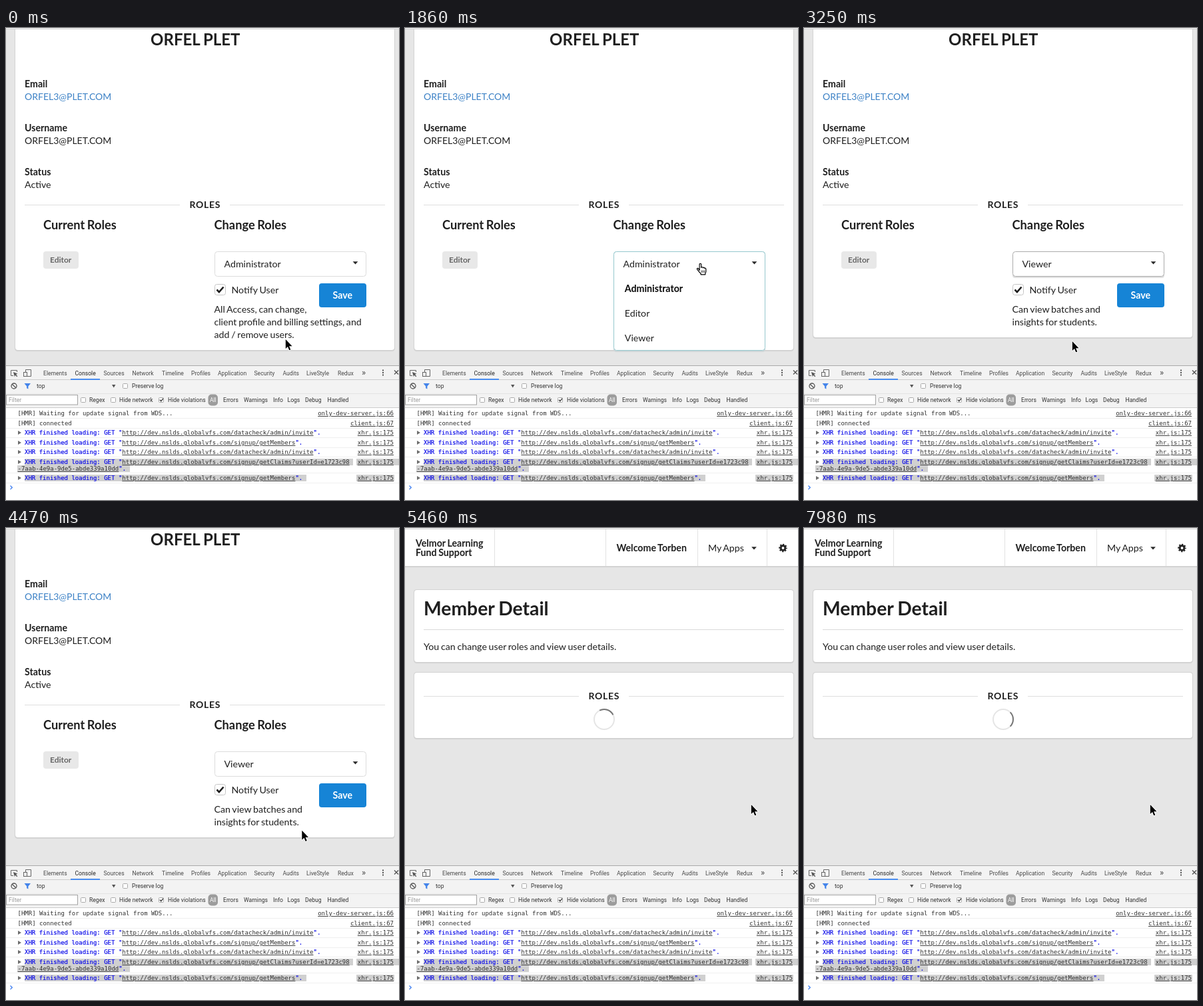
These frames come from a looping animation (590x708 px, 8000 ms). An HTML page:

```html
<!DOCTYPE html>
<html lang="en">
<head>
<meta charset="utf-8">
<title>Member roles</title>
<style>
html, body { margin: 0; width: 590px; height: 708px; overflow: hidden; background: #e6e6e6; }
svg { display: block; }
text { white-space: pre; font: 14.2px Lato, sans-serif; word-spacing: -.9px; fill: #1f1f1f; }
.b { font-weight: 700; }
.ui text { font: 8.6px Roboto, sans-serif; word-spacing: 0; fill: #484848; }
.log text { font: 9px "DejaVu Sans Mono", monospace; word-spacing: 0; fill: #303030; }
.log .blue { fill: #0808e8; stroke: #0808e8; stroke-width: .2px; }
.log .url { text-decoration: underline; }
</style>
</head>
<body>
<svg id="stage" width="590" height="708" viewBox="0 0 590 708"></svg>
<script>
const NS = 'http://www.w3.org/2000/svg';
const stage = document.getElementById('stage');

function el(parent, tag, attrs = {}, text) {
  const node = document.createElementNS(NS, tag);
  for (const k in attrs) node.setAttribute(k, attrs[k]);
  if (text !== undefined) node.textContent = text;
  parent.appendChild(node);
  return node;
}
const group = (parent, cls = '') => el(parent, 'g', { class: cls });
const rect = (p, x, y, width, height, fill, more) => el(p, 'rect', { x, y, width, height, fill, ...more });
const path = (p, d, more) => el(p, 'path', { d, ...more });
const line = (p, d, stroke = '#dedede', more) => path(p, d, { fill: 'none', stroke, ...more });
function label(p, x, y, s, style = '', cls = '', anchor = 'start') {
  return el(p, 'text', { x, y, style, class: cls, 'text-anchor': anchor }, s);
}
const bold = (p, x, y, s, size = 14.2, anchor) => label(p, x, y, s, `font-size:${size}px`, 'b', anchor);
const caret = (p, x, y) => path(p, `M${x - 3.9} ${y}h7.8l-3.9 4.2z`, { fill: '#2a2a2a' });
const show = (node, on) => node.setAttribute('display', on ? 'inline' : 'none');

function card(p, y, h) {
  return [
    rect(p, 13, y - 1, 571, h + 3, '#d3d3d3', { rx: 4.5 }),
    rect(p, 14, y, 569, h, '#fff', { rx: 4 }),
  ];
}
function divider(p, y) {
  line(p, `M28 ${y + .5}H261M336 ${y + .5}H569`);
  label(p, 298.9, y + 5, 'ROLES', 'font-size:14px;letter-spacing:.7px', 'b', 'middle');
}

// Role editor view
rect(stage, 0, 0, 590, 708, '#e6e6e6');
const detail = group(stage);
const cardParts = card(detail, -10, 493);
bold(detail, 284.3, 26, 'ORFEL PLET', 24, 'middle');
bold(detail, 28, 89, 'Email');
label(detail, 28, 108, 'ORFEL3@PLET.COM', 'fill:#3d82c6;font-size:14px');
bold(detail, 28, 155, 'Username');
label(detail, 28, 174, 'ORFEL3@PLET.COM', 'font-size:14px');
bold(detail, 28, 221, 'Status');
label(detail, 28, 240, 'Active');
divider(detail, 265);
bold(detail, 56, 302, 'Current Roles', 18.25);
bold(detail, 312.5, 302, 'Change Roles', 18.25);
rect(detail, 56, 335, 53, 26, '#e8e8e8', { rx: 4 });
label(detail, 66, 352, 'Editor', 'font-size:12px;fill:#666', 'b');

const form = group(detail);
rect(form, 313.5, 384.5, 16, 16, '#fff', { rx: 3, stroke: '#c4c4c4' });
line(form, 'M316.5 392.5l3.4 3.6l6.6-7.6', '#1c1c1c', { 'stroke-width': 2.6 });
label(form, 338.5, 398, 'Notify User');
const save = rect(form, 470, 383, 71, 36, '#1684d6', { rx: 4 });
label(form, 505.3, 406, 'Save', 'fill:#fff', 'b', 'middle');
function note(lines) {
  const g = group(form);
  lines.forEach((s, i) => label(g, 312.5, 427 + 19 * i, s));
  return g;
}
const adminNote = note(['All Access, can change,', 'client profile and billing settings, and', 'add / remove users.']);
const viewerNote = note(['Can view batches and', 'insights for students.']);

const glow = rect(detail, 313, 337, 228, 38, '#000', { rx: 4 });
const select = rect(detail, 313.5, 335.5, 227, 37, '#fff', { rx: 4 });
const menu = group(detail);
rect(menu, 313, 345, 228, 141, '#cfd6d8', { rx: 4 });
rect(menu, 313.5, 335.5, 227, 148, '#fff', { rx: 4, stroke: '#96c8ce' });
bold(menu, 329.8, 396, 'Administrator').style.fill = '#0a0a0a';
const items = ['Editor', 'Viewer'].map((s, i) => label(menu, 329.8, 433 + 37 * i, s));
const choice = label(detail, 327.5, 359, '');
caret(detail, 524.5, 350.2);

// Reloaded view
const home = group(stage);
rect(home, 0, 2, 590, 57, '#d3d3d3');
rect(home, 0, 2, 590, 55, '#fff');
line(home, 'M134.5 2V57M301.5 2V57M439.5 2V57M543.5 2V57', '#e2e2e2');
bold(home, 16, 27.5, 'Velmor Learning');
bold(home, 16, 42, 'Fund Support');
bold(home, 317.5, 35, 'Welcome Torben');
label(home, 455, 35, 'My Apps');
caret(home, 524, 28.2);
el(home, 'circle', { cx: 567.5, cy: 30, r: 3.4, fill: 'none', stroke: '#262626', 'stroke-width': 3 });
el(home, 'circle', { cx: 567.5, cy: 30, r: 5.3, fill: 'none', stroke: '#262626', 'stroke-width': 2, 'stroke-dasharray': '2.2 1.963', 'stroke-dashoffset': 1.1 });
card(home, 93, 108);
bold(home, 28, 131, 'Member Detail', 28.3);
line(home, 'M28 152.5H569', '#d9d9d9');
label(home, 28, 183, 'You can change user roles and view user details.');
card(home, 217, 98);
divider(home, 252);
el(home, 'circle', { cx: 299, cy: 287, r: 15, fill: 'none', stroke: '#e5e5e5', 'stroke-width': 2 });
const arc = line(home, 'M288.4 276.4A15 15 0 0 1 309.6 276.4', '#767676', { 'stroke-width': 2 });

rect(stage, 0, 0, 590, 1, '#f4f4f4');
rect(stage, 0, 1, 590, 1, '#d2d2d2');

// Developer tools
const ui = group(stage, 'ui');
rect(ui, 0, 506, 590, 202, '#fff');
rect(ui, 0, 506, 590, 63, '#f3f3f3');
line(ui, 'M0 506.5H590', '#a9a9a9');
line(ui, 'M0 527.5H590M0 569.5H590', '#cccccc');
line(ui, 'M0 548.5H590', '#e4e4e4');
const row = (y, words, fill) => words.forEach(([x, s]) => label(ui, x, y, s, fill ? 'fill:' + fill : ''));
row(521, [[56, 'Elements'], [146.5, 'Sources'], [189.5, 'Network'], [234, 'Timeline'], [278, 'Profiles'],
  [318, 'Application'], [372.5, 'Security'], [415.5, 'Audits'], [451, 'LiveStyle']]);
label(ui, 103.5, 521, 'Console', 'fill:#222');
label(ui, 498, 520.5, 'Redux');
label(ui, 534, 521, '»', 'font-size:13px');
rect(ui, 97, 526, 44, 2, '#4a8df0');
for (const y of [513.5, 517, 520.5]) rect(ui, 565, y - 1, 2, 2, '#555');
line(ui, 'M583 513.5l6 6m0-6l-6 6', '#555', { 'stroke-width': 1.4 });
line(ui, 'M11 521.5H7.5V513.5H16.5V516', '#666');
path(ui, 'M11 516l6.5 2.8l-2.6 1l2.4 2.4l-1 1l-2.4-2.4l-1 2.4z', { fill: '#555' });
line(ui, 'M29.5 517V512.5H37.5V522.5H32', '#666');
rect(ui, 26.5, 516.5, 5, 6, '#f3f3f3', { stroke: '#666' });

el(ui, 'circle', { cx: 12, cy: 537, r: 4, fill: 'none', stroke: '#555', 'stroke-width': 1.3 });
line(ui, 'M9.2 534.2l5.6 5.6', '#555', { 'stroke-width': 1.3 });
path(ui, 'M27.5 533h9.5l-3.6 4.6v4l-2.3-1.4v-2.6z', { fill: '#4484ea' });
row(540, [[46, 'top'], [189, 'Preserve log']], '#333');
path(ui, 'M159 535h5.5l-2.75 4.5z', { fill: '#555' });

rect(ui, .5, 550.5, 107, 14.5, '#fff', { stroke: '#a3a3a3' });
label(ui, 4, 561, 'Filter', 'fill:#9a9a9a');
const box = (x, y) => rect(ui, x + .5, y + .5, 7, 7, '#fff', { rx: 1, stroke: '#aaa' });
box(175, 533);
for (const x of [112, 157, 229]) box(x, 554);
line(ui, 'M231 557.8l1.8 2l3.2-4.2', '#333', { 'stroke-width': 1.3 });
rect(ui, 303.5, 549.5, 14.5, 17, '#9c9c9c', { rx: 5 });
label(ui, 310.8, 561, 'All', 'fill:#fff', '', 'middle');
row(561, [[125, 'Regex'], [170, 'Hide network'], [243, 'Hide violations'], [326, 'Errors'], [357, 'Warnings'],
  [401, 'Info'], [422.5, 'Logs'], [449, 'Debug'], [482.5, 'Handled']], '#333');

const log = group(stage, 'log');
const host = 'http://dev.nslds.globalvfs.com/';
const span = (node, s, cls) => el(node, 'tspan', { class: cls }, s);
const link = (y, s) => label(log, 582, y, s, '', 'url', 'end');
function xhr(y, url, tail = '".') {
  path(log, `M18 ${y - 6}l5 3l-5 3z`, { fill: '#6e6e6e' });
  const t = label(log, 28, y, '');
  span(t, 'XHR finished loading: GET "', 'blue');
  span(t, host + url, 'url');
  span(t, tail, 'blue');
  link(y, 'xhr.js:175');
}
for (const [x, y, w] of [[28, 646, 493], [17, 656, 169], [526, 646, 64], [28, 670, 423], [526, 670, 57]])
  rect(log, x, y, w, 10, '#d0d0d0');
line(log, 'M0 585.5H590M0 600.5H590M0 614.5H590M0 629.5H590M0 643.5H590M0 667.5H590M0 682.5H590', '#f0f0f0');
label(log, 17.5, 581, '[HMR] Waiting for update signal from WDS...');
link(581, 'only-dev-server.js:66');
label(log, 17.5, 596, '[HMR] connected');
link(596, 'client.js:67');
xhr(610, 'datacheck/admin/invite');
xhr(625, 'signup/getMembers');
xhr(639, 'datacheck/admin/invite');
xhr(654, 'signup/getClaims?userId=e1723c98', '');
const rest = label(log, 17.5, 664, '');
span(rest, '-7aab-4e9a-9de5-abde339a10dd', 'url');
span(rest, '".', 'blue');
xhr(678, 'signup/getMembers');
line(log, 'M6.5 686.5l2.8 2.8l-2.8 2.8', '#3b7cf0', { 'stroke-width': 1.3 });

// Pointers
const pointer = group(stage);
const arrow = path(pointer, 'M.3 .5V14.6L3.5 11.5L5.7 16.8L7.8 15.9L5.6 10.7H10Z',
  { fill: '#000', stroke: '#fff', 'stroke-width': 1.8, 'paint-order': 'stroke', 'stroke-linejoin': 'round' });
const hand = group(pointer);
path(hand, 'M4.6 11V2.4Q4.6.8 5.9.8T7.2 2.4V7Q7.4 6 8.5 6T9.8 7.4Q10 6.7 11 6.7T12.2 8Q12.5 7.5 13.2 7.6T14.3 9V12.5Q14.2 14 13.3 15.5V17.3H6.6V15.8Q4.5 14 2.8 11.6L1 9.4Q.6 8.2 1.8 7.9T4.6 11Z',
  { fill: '#fff', stroke: '#000', 'stroke-width': 1.2, 'stroke-linejoin': 'round' });
line(hand, 'M7.8 11v3.5M9.9 11v3.5M12 11v3.5', '#000', { 'stroke-width': .8 });

// time, x, y, hand?
const route = [
  [0, 419.5, 466.5], [60, 419.5, 466.5], [330, 397, 577], [600, 465, 475], [810, 454.5, 373.5], [860, 453, 368],
  [920, 450, 362], [980, 444, 354, 1], [1040, 442, 352, 1], [1580, 442, 352, 1], [1680, 437.5, 352.5, 1],
  [2150, 437.5, 352.5, 1], [2450, 428, 410, 1], [2730, 399, 474, 1], [2910, 399, 474, 1], [3020, 398.5, 471, 1],
  [3249, 398.5, 471, 1], [3250, 402.5, 469.5], [3480, 402.5, 469.5], [3650, 402, 467], [4250, 402, 467],
  [4650, 478, 442], [4930, 523, 421], [5050, 520, 418], [5109, 520, 418], [5110, 515, 416, 1],
  [5459, 515, 416, 1], [5460, 519.5, 414.5], [8000, 519.5, 414.5],
];
const ramp = (t, a, b) => Math.min(1, Math.max(0, (t - a) / (b - a)));
const mix = (a, b, k) => `rgb(${a.map((v, i) => Math.round(v + (b[i] - v) * k))})`;
const PALE = [220, 220, 220], TEAL = [150, 200, 206], DARK = [172, 172, 172];

function draw(t) {
  const loaded = t >= 5460, picked = t >= 3250;
  show(detail, !loaded);
  show(home, loaded);

  const i = route.findIndex(r => r[0] > t) - 1;
  const [ta, xa, ya, isHand] = route[i], [tb, xb, yb] = route[i + 1];
  const k = ramp(t, ta, tb), y = ya + (yb - ya) * k;
  pointer.setAttribute('transform', `translate(${xa + (xb - xa) * k} ${y})`);
  show(arrow, !isHand);
  show(hand, isHand);

  const open = t >= 1860 && !picked;
  show(menu, open);
  show(form, !open);
  show(adminNote, !picked);
  show(viewerNote, picked);
  choice.textContent = picked ? 'Viewer' : 'Administrator';
  items.forEach((item, n) => {
    const over = open && y > 409 + 37 * n && y < 446 + 37 * n;
    item.style.fill = over ? '#0d0d0d' : '#1f1f1f';
  });
  cardParts[0].setAttribute('height', picked ? 477 : 496);
  cardParts[1].setAttribute('height', picked ? 474 : 493);

  const fade = 1 - ramp(t, 3480, 3650);
  select.setAttribute('stroke', picked ? mix(PALE, DARK, fade) : mix(PALE, TEAL, ramp(t, 1580, 1680)));
  glow.setAttribute('opacity', picked ? .12 * fade : 0);
  save.setAttribute('fill', t >= 5350 ? '#0b6fb4' : '#1684d6');

  const tick = 5460 + Math.floor((t - 5460) / 60) * 60;
  arc.setAttribute('transform', `rotate(${90 + (tick - 7980) * .6} 299 287)`);
}

const start = performance.now();
function loop() {
  draw((performance.now() - start) % 8000);
  requestAnimationFrame(loop);
}
draw(0);
loop();
</script>
</body>
</html>
```
